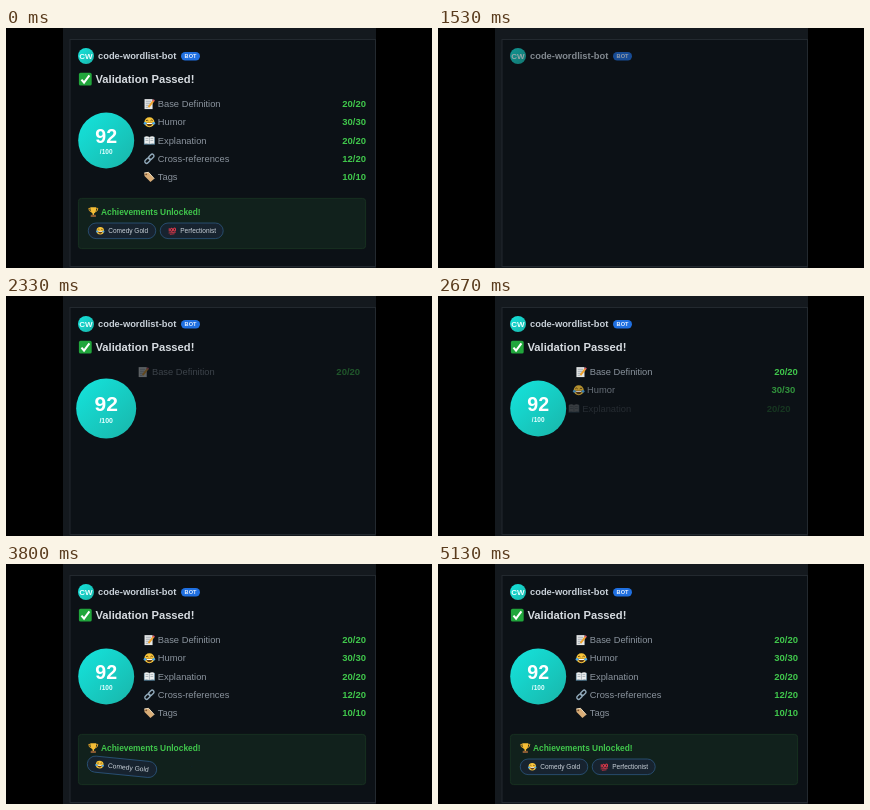
Animation of 426 by 240 pixels, one loop 5.67 s. Source, as an HTML page:

```html
<!DOCTYPE html>
<html lang="en">
<head>
<meta charset="utf-8">
<title>Validation result</title>
<style>
  html, body { margin: 0; width: 100%; height: 100%; overflow: hidden; background: #000; }
  svg { display: block; width: 100%; height: 100%; font-family: "Liberation Sans", Arial, sans-serif; }
  .bold { font-weight: bold; }
  .mid { text-anchor: middle; }
  .end { text-anchor: end; }
  .label { font-size: 9.33px; fill: #8b949e; }
  .value { font-size: 9.5px; fill: #40c74c; font-weight: bold; text-anchor: end; }
  .badge rect { fill: #17232f; stroke: #2c567e; stroke-width: .8; }
  .badge text { font-size: 6.53px; fill: #c9d1d9; }
</style>
</head>
<body>
<svg viewBox="0 0 426 240">
  <defs>
    <linearGradient id="teal" x1="0" y1="0" x2="1" y2="1">
      <stop offset="0" stop-color="#14e5de"/><stop offset="1" stop-color="#19b5a9"/>
    </linearGradient>
    <!-- Icons fit a 10 × 10 box centred on the origin -->
    <g id="check">
      <rect x="-5" y="-5" width="10" height="10" rx="1.3" fill="#21a63c"/>
      <path d="M-3 .3-1 2.6 3.2-3" fill="none" stroke="#fff" stroke-width="1.6"/>
    </g>
    <g id="memo">
      <path d="M-4.6-4.6H3V4.8H-4.6z" fill="#e6e8e8"/>
      <path d="M-3.4-2.6H1.6M-3.4-.7H1.2M-3.4 1.2H0M-3.4 3.1H-.8" stroke="#8d979f" stroke-width=".7"/>
      <path d="M-.8 3 4-3.2" stroke="#f0a32c" stroke-width="1.8"/>
      <path d="M3.5-2.6 4.5-4" stroke="#e0586a" stroke-width="1.8"/>
    </g>
    <g id="joy">
      <circle r="4.8" fill="#f8c53a"/>
      <path d="M-3.2-1.3Q-2.2-2.8-1-1.3M1-1.3Q2.2-2.8 3.2-1.3" fill="none" stroke="#5d3a16" stroke-width=".8"/>
      <path d="M-3 .5H3Q2.6 3.7 0 3.7T-3 .5" fill="#5d3a16"/>
      <path d="M-2.6.6H2.6L2.3 1.6H-2.3z" fill="#fff"/>
      <circle cx="-4.1" cy="1" r="1.3" fill="#4aa8e8"/><circle cx="4.1" cy="1" r="1.3" fill="#4aa8e8"/>
    </g>
    <g id="book">
      <path d="M-5.2-3.2H5.2V4H-5.2z" fill="#527a91"/>
      <path d="M-4.6-3.6Q-2-4.4 0-3.2 2-4.4 4.6-3.6V3Q2 2.4 0 3.4-2 2.4-4.6 3z" fill="#eceeee"/>
      <path d="M0-3.2V3.4M-3.6-1.8H-1M-3.6 0H-1M1-1.8H3.6M1 0H3.6" stroke="#8f9ba3" stroke-width=".6"/>
    </g>
    <g id="link" fill="none" stroke="#91a9ba" stroke-width="1.3" transform="rotate(-45)">
      <rect x="-5.4" y="-1.7" width="5.8" height="3.4" rx="1.7"/>
      <rect x="-.4" y="-1.7" width="5.8" height="3.4" rx="1.7"/>
    </g>
    <g id="tag">
      <path d="M-4.8-3.8-.8-4.4 4.6 1.6 1 4.8-4.6-1z" fill="#d9ad77"/>
      <path d="M-4.8-3.8-.8-4.4 4.6 1.6" fill="none" stroke="#efe0c4" stroke-width=".9"/>
      <circle cx="-3" cy="-2.5" r=".9" fill="#7c5230"/>
    </g>
    <g id="cup">
      <path d="M-3-3.6H-4.5Q-4.5-.6-2-.2M3-3.6H4.5Q4.5-.6 2-.2" fill="none" stroke="#e0a32a" stroke-width="1"/>
      <path d="M-3-4.8H3Q3 .3.7 1.4V3H-.7V1.4Q-3 .3-3-4.8" fill="#f5bd35"/>
      <path d="M-2.6 2.8H2.6V5H-2.6z" fill="#8a5a34"/>
    </g>
    <g id="hundred" fill="none" stroke="#e2384a" stroke-width="1.3">
      <path d="M-3.8-3.2V1"/>
      <ellipse cx="-.8" cy="-1.3" rx="1.3" ry="2"/><ellipse cx="3" cy="-1.6" rx="1.3" ry="2"/>
      <path d="M-4.6 2.8 4.6 1.8M-3 4.5 3 3.8" stroke-width="1"/>
    </g>
  </defs>

  <rect width="426" height="240"/>
  <rect x="57" width="313" height="240" fill="#14191e"/>
  <rect x="64" y="11.5" width="305.5" height="227" fill="#0c1116" stroke="#23292f"/>

  <g id="header">
    <circle cx="80" cy="28" r="8" fill="url(#teal)"/>
    <text class="bold mid" x="80" y="30.9" font-size="8" fill="#e9ffff">CW</text>
    <text class="bold" x="92" y="31.2" font-size="9.33" fill="#c9d1d9">code-wordlist-bot</text>
    <rect x="175" y="24" width="19" height="8.4" rx="4.2" fill="#1f6fe0"/>
    <text class="bold mid" x="184.5" y="30.2" font-size="5.6" fill="#e8f1ff">BOT</text>
  </g>
  <g id="title">
    <use href="#check" transform="translate(79.3 51.2) scale(1.28)"/>
    <text class="bold" x="89.5" y="55" font-size="11.2" fill="#d7dce1">Validation Passed!</text>
  </g>
  <g id="score">
    <circle r="28" fill="url(#teal)"/>
    <text class="bold mid" y="2.6" font-size="19.6" fill="#fff">92</text>
    <text class="bold mid" y="13.7" font-size="6.5" fill="#e4ffff">/100</text>
  </g>
  <g id="rows"></g>
  <g id="panel">
    <rect x="72.4" y="170.4" width="287.2" height="50.2" rx="3" fill="#11211c" stroke="#1a3523" stroke-width=".8"/>
    <use href="#cup" transform="translate(87.3 184)"/>
    <text class="bold" x="95" y="187" font-size="8.4" fill="#40c74c">Achievements Unlocked!</text>
    <g id="badges"></g>
  </g>
</svg>
<script>
const LOOP = 5670, START = 1308;
const $ = id => document.getElementById(id);

const rows = [
  ['memo', 'Base Definition', '20/20'],
  ['joy', 'Humor', '30/30'],
  ['book', 'Explanation', '20/20'],
  ['link', 'Cross-references', '12/20'],
  ['tag', 'Tags', '10/10'],
];
const badges = [
  { icon: 'joy', label: 'Comedy Gold', x: 116, width: 67.5 },
  { icon: 'hundred', label: 'Perfectionist', x: 185.7, width: 63 },
];

$('rows').innerHTML = rows.map(([icon, label, value], i) => {
  const y = 76 + i * 18.25;
  return `<g><use href="#${icon}" transform="translate(143.4 ${y}) scale(1.06)"/>
    <text class="label" x="151.8" y="${y + 3.2}">${label}</text>
    <text class="value" x="360" y="${y + 3.2}">${value}</text></g>`;
}).join('');

$('badges').innerHTML = badges.map(({ icon, label, width }) => `<g class="badge">
    <rect x="${-width / 2}" y="-7.8" width="${width}" height="15.6" rx="7.8"/>
    <use href="#${icon}" transform="translate(${12 - width / 2}) scale(.78)"/>
    <text x="${20 - width / 2}" y="2.3">${label}</text></g>`).join('');

function bezier(x1, y1, x2, y2) {
  const curve = (a, b, u) => 3 * (1 - u) ** 2 * u * a + 3 * (1 - u) * u * u * b + u ** 3;
  return x => {
    if (x <= 0 || x >= 1) return x <= 0 ? 0 : 1;
    let low = 0, high = 1;
    for (let i = 0; i < 24; i++) {
      const mid = (low + high) / 2;
      if (curve(x1, x2, mid) < x) low = mid; else high = mid;
    }
    return curve(y1, y2, low);
  };
}
const easeOut = bezier(0, 0, .58, 1);
const backInOut = bezier(.68, -.55, .265, 1.55);

function draw(now) {
  // The loop opens on the finished card and replays it from START.
  const time = now % LOOP - START;
  const play = (ease, delay, duration) => time < 0 ? 1 : ease((time - delay) / duration);
  const fade = (node, delay) => {
    const p = play(easeOut, delay, 500);
    node.setAttribute('opacity', p);
    return p;
  };

  fade($('header'), 0);
  fade($('title'), 300);
  $('score').setAttribute('transform', `translate(100.2 112.5) scale(${play(backInOut, 600, 600)})`);
  [...$('rows').children].forEach((row, i) => {
    const p = fade(row, 900 + i * 200);
    row.setAttribute('transform', `translate(${(p - 1) * 9.33})`);
  });
  fade($('panel'), 1900);
  [...$('badges').children].forEach((badge, i) => {
    const p = play(backInOut, 2100 + i * 200, 600);
    badge.setAttribute('transform', `translate(${badges[i].x} 202.8) rotate(${(p - 1) * 180}) scale(${p})`);
  });
}

const begin = performance.now();
function tick() {
  draw(performance.now() - begin);
  requestAnimationFrame(tick);
}
tick();
</script>
</body>
</html>
```
